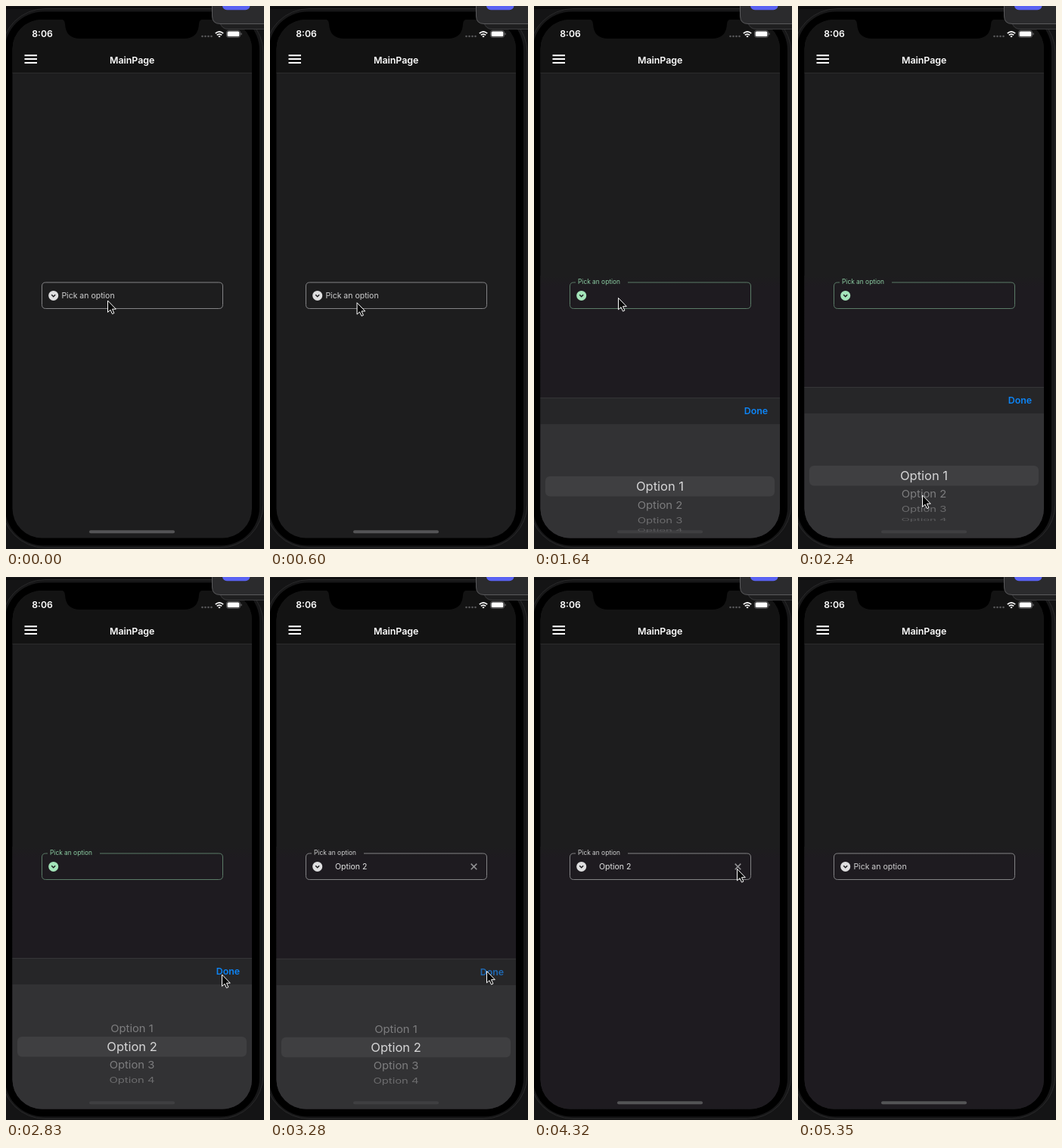
Recreate the animation shown at these times as an HTML page. Size 341 by 717 pixels, loop 6.1 s.

```html
<!DOCTYPE html>
<html lang="en">
<head>
<meta charset="utf-8">
<title>Picker field</title>
<style>
  html, body { margin: 0; width: 100%; height: 100%; overflow: hidden; background: #0b0b0c; }
  svg { display: block; width: 341px; height: 717px; }
  text { font-family: Inter, "Open Sans", sans-serif; }
  .bold { font-weight: 600; fill: #fff; }
</style>
</head>
<body>
<svg viewBox="0 0 341 717" fill="none">
  <defs>
    <clipPath id="screen"><rect x="8.5" y="18" width="316.5" height="684.5" rx="39"/></clipPath>
    <linearGradient id="tint" x1="0" y1="0" x2="0" y2="1">
      <stop offset="0" stop-color="#1d1d1e"/>
      <stop offset=".04" stop-color="#1e1b20"/>
    </linearGradient>
  </defs>

  <!-- phone body -->
  <rect width="341" height="717" fill="#141415"/>
  <path d="M0 2.5H341" stroke="#0a0a0a" stroke-width="2"/>
  <rect x="-6" y="3.5" width="346" height="712" rx="58" fill="#171718" stroke="#29292a"/>
  <rect x="-1.5" y="7.5" width="336.5" height="705" rx="51" fill="#000"/>

  <g clip-path="url(#screen)">
    <rect x="8" y="18" width="318" height="685" fill="#1d1d1e"/>
    <rect id="lower" x="8" y="356" width="318" height="347" fill="url(#tint)"/>
    <rect x="8" y="18" width="318" height="70" fill="#131313"/>
    <path d="M8 88.5H326" stroke="#2b2b2c"/>

    <!-- field -->
    <path id="border"/>
    <circle id="knob" cx="62.7" cy="382.4" r="6.5"/>
    <path d="M60.2 381.3l2.5 2.5 2.5-2.5" stroke="#1d1d1f" stroke-width="1.5"/>
    <text id="label">Pick an option</text>
    <g id="value">
      <text x="86" y="386.3" font-size="10.5" fill="#e4e4e4">Option 2</text>
      <path d="M265.7 378.6l7.6 7.6m0-7.6l-7.6 7.6" stroke="#929294" stroke-width="1.5"/>
    </g>

    <!-- picker, laid out at its open position -->
    <g id="picker">
      <rect x="8" y="503" width="318" height="35" fill="#262628"/>
      <path d="M8 503.5H326" stroke="#353537"/>
      <rect x="8" y="538" width="318" height="200" fill="#323234"/>
      <rect x="15" y="607" width="303" height="26.5" rx="6" fill="#3f3f41"/>
      <g id="wheel" text-anchor="middle" fill="#d6d6d7"></g>
      <text id="done" class="bold" x="277.7" y="525" font-size="12.4">Done</text>
    </g>
    <rect id="home" x="110" y="692.3" width="113" height="4" rx="2" fill="#545456"/>
  </g>

  <!-- notch, status bar and title -->
  <path d="M72 17Q78 18 78 24Q79 43 98 43H235Q254 43 255 24Q255 18 261 17Z" fill="#000"/>
  <text class="bold" x="34.3" y="41.3" font-size="12.2">8:06</text>
  <text class="bold" x="166.7" y="75.8" font-size="12.4" text-anchor="middle">MainPage</text>
  <path d="M24.5 65.3h16.5m-16.5 4.8h16.5m-16.5 4.8h16.5" stroke="#fff" stroke-width="2"/>
  <path d="M259.5 40h13" stroke="#58585a" stroke-width="2.6" stroke-linecap="round" stroke-dasharray="0 4"/>
  <path d="M276.8 36.2q5.2-4.6 10.4 0M278.8 38.4q3.2-2.7 6.4 0" stroke="#fff" stroke-width="1.7"/>
  <path d="M280.3 39.9q1.7-1.3 3.4 0l-1.7 1.7z" fill="#fff"/>
  <rect x="291.5" y="32.4" width="18" height="9" rx="2.6" stroke="#6a6a6c" stroke-width=".8"/>
  <rect x="292.6" y="33.5" width="15.8" height="6.8" rx="1.6" fill="#fff"/>
  <path d="M311 35.5v2.8" stroke="#6a6a6c" stroke-width="1.2"/>

  <!-- window overlapping the corner -->
  <path d="M283 22Q285 30.5 294 30.5H342V0H283Z" fill="#1f1f20" stroke="#3c3c3e"/>
  <path d="M272.5-2V13Q272.5 23.5 283 23.5H342V-2Z" fill="#2b2b2d" stroke="#59595b"/>
  <rect x="286" y="-12" width="36.5" height="17.3" rx="6" fill="#5a62f2"/>

  <path id="cursor" d="M.5 0V15.4L4 12.2 6.5 17.6 8.9 16.5 6.5 11.2H11.3Z" fill="#050505" stroke="#fff"/>
</svg>
<script>
const LOOP = 6100, STEP = 148.6;
const OPEN = 1398, PICK = 3264, CLEAR = 4750, LEAVE = 5340;

const $ = id => document.getElementById(id);
const set = (el, attrs) => { for (const k in attrs) el.setAttribute(k, attrs[k]); };
const clamp = v => Math.max(0, Math.min(1, v));
const mix = (a, b, p) => a + (b - a) * p;
const ramp = (t, from, to) => clamp((t - from) / (to - from));
const smooth = p => p * p * (3 - 2 * p);
const between = (t, from, to) => t >= from && t < to;

// Critically damped spring, 0 to 1
function spring(ms) {
  const w = Math.max(0, ms) * 0.01826;
  return 1 - Math.exp(-w) * (1 + w);
}

// Pointer legs; dip bends the path downwards
const home = { x: 134, y: 389 };
const legs = [
  { from: 150, to: 740, x: 111, y: 389, dip: 6 },      // along the field
  { from: 900, to: 1040, x: 111, y: 385.5 },           // tap it
  { from: 1640, to: 2220, x: 164, y: 646 },            // down to the wheel
  { from: 2230, to: 2520, x: 168, y: 621 },            // drag
  { from: 2520, to: 2820, x: 285, y: 525 },            // to Done
  { from: 2820, to: 3260, x: 286, y: 520.5 },
  { from: 3420, to: 4300, x: 268, y: 385.5 },          // to the cross
  { from: 4620, to: LEAVE, x: 330, y: 670 }            // away
];

function pointer(t) {
  let { x, y } = home;
  for (const leg of legs) {
    const p = smooth(ramp(t, leg.from, leg.to));
    x = mix(x, leg.x, p);
    y = mix(y, leg.y, p) + (leg.dip || 0) * Math.sin(Math.PI * p);
  }
  return [x, y];
}

const items = [1, 2, 3, 4].map(n => {
  const el = document.createElementNS("http://www.w3.org/2000/svg", "text");
  el.textContent = "Option " + n;
  $("wheel").append(el);
  return el;
});

// Options lie on a cylinder seen from the front
function drawWheel(pos) {
  items.forEach((el, i) => {
    const d = i - pos, far = Math.abs(d), angle = d * 0.4;
    set(el, {
      transform: `translate(166.5 ${619.8 + 62 * Math.sin(angle)}) scale(1 ${Math.cos(angle)})`,
      y: 6,
      "font-size": mix(16.5, 14.8, clamp(far)),
      opacity: mix(1, 0.46, clamp(far)) - 0.1 * Math.max(0, far - 1)
    });
  });
}

function drawField(t) {
  const up = ramp(t, OPEN, OPEN + 160) - ramp(t, CLEAR - 70, CLEAR + 80);
  const green = between(t, OPEN, PICK);
  const left = mix(90, 55, up), right = mix(90, 124, up);
  set($("border"), {
    d: `M${right} 365H281.5q5 0 5 5v24.5q0 5-5 5h-229q-5 0-5-5V370q0-5 5-5H${left}`,
    stroke: green ? "#5b7b67" : "#838385"
  });
  set($("knob"), { fill: green ? "#a4e5ba" : "#dfdfe0" });
  set($("label"), {
    x: mix(73.4, 58, up), y: mix(386.3, 366.6, up), "font-size": mix(10.5, 8.4, up),
    fill: green ? "#8ccda3" : "#d0d0d1"
  });
  set($("value"), { opacity: +between(t, PICK, CLEAR) });
}

function draw(t) {
  const open = spring(t - OPEN) - spring(t - PICK);
  set($("picker"), {
    transform: `translate(0 ${199 * (1 - open)})`,
    visibility: open > 0.05 ? "visible" : "hidden"
  });
  set($("done"), { style: `fill:${t > PICK ? "#1f69b3" : "#0d84f5"}` });
  drawWheel(smooth(ramp(t, 2230, 2520)));
  drawField(t);
  set($("lower"), { opacity: +(t >= OPEN) });
  set($("home"), { opacity: between(t, OPEN - 70, PICK + 300) ? 0.4 : 1 });
  set($("cursor"), {
    transform: `translate(${pointer(t)})`,
    visibility: t < LEAVE ? "visible" : "hidden"
  });
}

// The picture refreshes on a slow fixed beat
const start = performance.now();
function frame() {
  const t = (performance.now() - start) % LOOP;
  draw(Math.floor(t / STEP) * STEP);
  requestAnimationFrame(frame);
}
frame();
</script>
</body>
</html>
```
